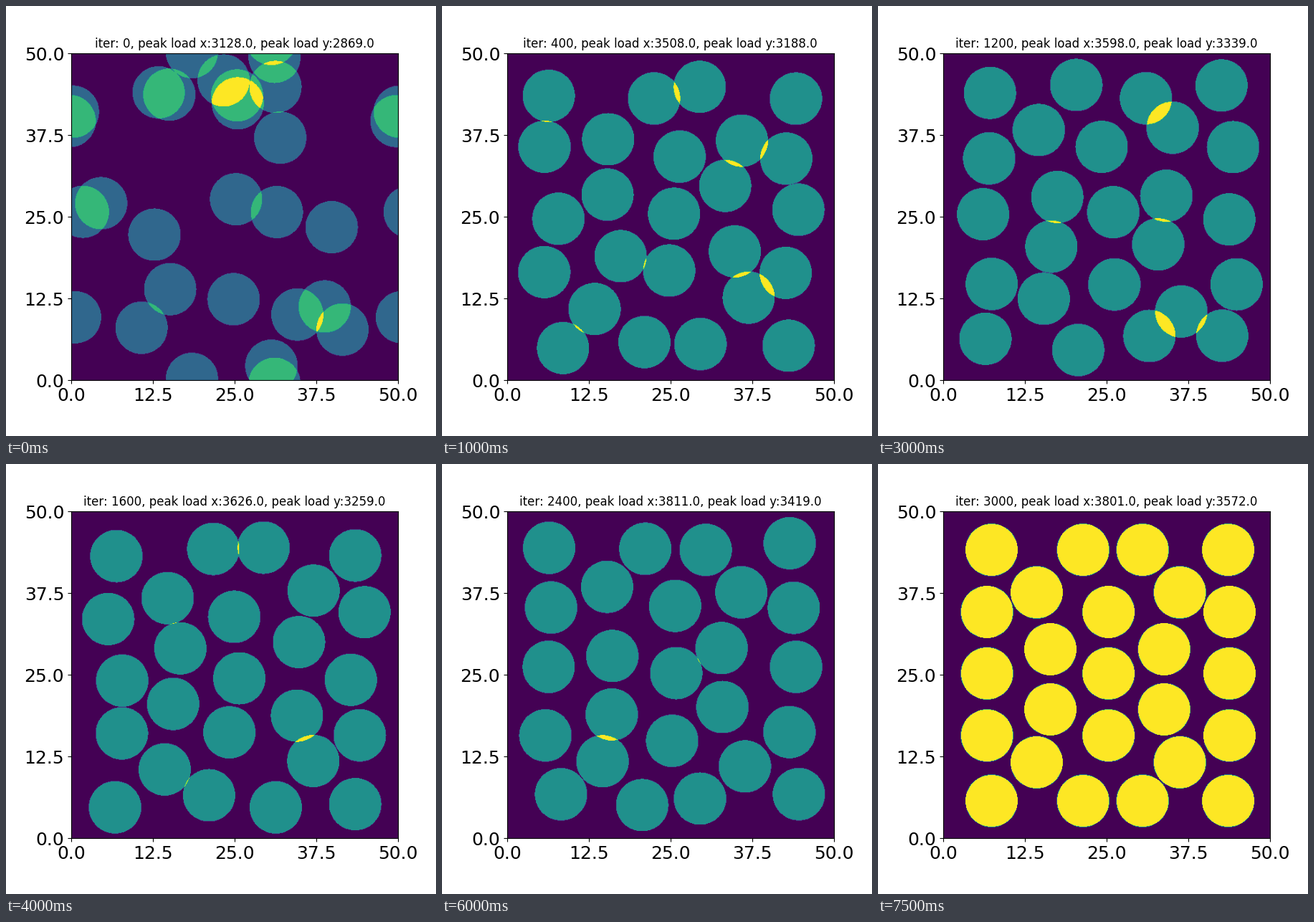
Recreate the animation shown at these times as a matplotlib script. Size 600x600 px, loop 8 s.

```python
import numpy as np
import matplotlib.pyplot as plt
from matplotlib.animation import FuncAnimation

SIZE, RADIUS, CELLS = 50.0, 4.0, 500
FRAMES, INTERVAL, ITERS = 16, 500, 200
WANDER = 1.1

# Peak loads at a few iterations, blended in between.
MARKS = [0, 400, 800, 1600, 2000, 2400, 3000]
PEAK_X = [3128, 3508, 3570, 3626, 3632, 3811, 3801]
PEAK_Y = [2869, 3188, 3419, 3259, 3400, 3419, 3572]

rng = np.random.default_rng(7)
axis = (np.arange(CELLS) + 0.5) * SIZE / CELLS


def rows(xs, ys):
    """Every combination of the given columns and rows."""
    return [(x, y) for y in ys for x in xs]


def coverage(centres):
    """How many discs cover each cell; the area wraps at its edges."""
    half = SIZE / 2
    count = np.zeros((CELLS, CELLS))
    for cx, cy in centres:
        dx = (axis - cx + half) % SIZE - half
        dy = (axis - cy + half) % SIZE - half
        count += dx[None, :] ** 2 + dy[:, None] ** 2 < RADIUS ** 2
    return count


# The settled packing: staggered rows of four, three and two discs.
home = np.array(rows([7.4, 21.4, 30.5, 43.6], [44.1, 5.7])
                + rows([6.7, 25.3, 43.8], [34.6, 25.2, 15.7])
                + rows([14.3, 36.2], [37.6, 11.6])
                + rows([16.4, 33.8], [28.9, 19.7]))

# A random start in which at most three discs share a spot.
start = rng.uniform(0, SIZE, home.shape)
while coverage(start).max() != 3:
    start = rng.uniform(0, SIZE, home.shape)

phase = rng.uniform(0, 2 * np.pi, home.shape)
cycles = rng.uniform(1, 3, home.shape)


def discs(frame):
    """Jump from the scatter to the packing, wander there, then come to rest."""
    p = frame / (FRAMES - 1)
    spread = 0.05 ** frame
    sway = WANDER * (1 - p ** 12) * np.sin(2 * np.pi * cycles * p + phase)
    return spread * start + (1 - spread) * (home + sway)


def caption(frame):
    iteration = frame * ITERS
    x, y = (round(np.interp(iteration, MARKS, peak)) for peak in (PEAK_X, PEAK_Y))
    return f"iter: {iteration}, peak load x:{x:.1f}, peak load y:{y:.1f}"


plt.rcParams["font.size"] = 18
fig, ax = plt.subplots(figsize=(6, 6), dpi=100)
image = ax.imshow(coverage(start), origin="lower", cmap="viridis",
                  extent=(0, SIZE, 0, SIZE))
ticks = np.linspace(0, SIZE, 5)
ax.set_xticks(ticks, [f"{v:.1f}" for v in ticks])
ax.set_yticks(ticks, [f"{v:.1f}" for v in ticks])
title = ax.set_title(caption(0), fontsize=12)
fig.tight_layout()


def draw(frame):
    count = coverage(discs(frame))
    image.set_data(count)
    image.set_clim(0, count.max())
    title.set_text(caption(frame))
    return image, title


anim = FuncAnimation(fig, draw, frames=FRAMES, interval=INTERVAL,
                     repeat=True, repeat_delay=0, blit=False)
plt.show()
```
